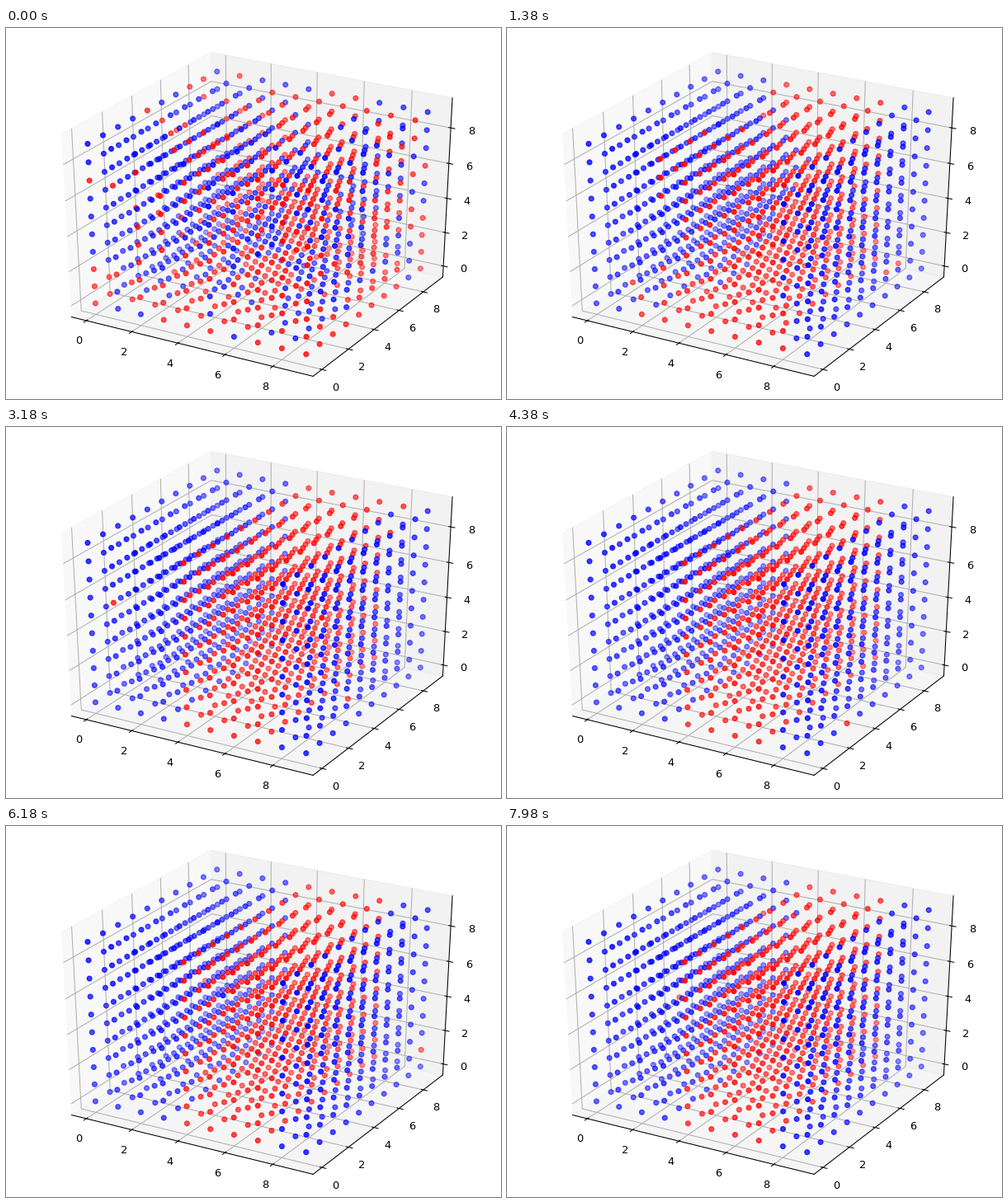
Recreate the animation shown at these times as a matplotlib script. Size 600 px wide and 450 px high, loop 8 s.

```python
import numpy as np
import matplotlib.pyplot as plt
from matplotlib.animation import FuncAnimation
from mpl_toolkits.mplot3d import Axes3D

N = 10
INTERVAL = 50
FRAMES = 160
FLIP_RATE = 0.004
TICKS = range(0, N, 2)
RED, BLUE = (1, 0, 0, 1), (0, 0, 1, 1)


class FullAxes3D(Axes3D):
    """3D axes that fill their whole rectangle instead of a square."""

    def apply_aspect(self, position=None):
        pass


def smooth_noise(seed):
    """Unit noise on the periodic lattice, correlated between neighbours."""
    noise = np.random.default_rng(seed).normal(size=(N, N, N))
    for axis in range(3):
        noise += 0.2 * (np.roll(noise, 1, axis) + np.roll(noise, -1, axis))
    return (noise - noise.mean()) / noise.std()


i, j, k = np.indices((N, N, N))
noise = smooth_noise(7)

# Distance from the edge j = k = 0 on the periodic lattice
reach = np.minimum(j, N - j) + np.minimum(k, N - k)


def spins_at(step):
    """A noisy red blob relaxes into a flat slab, with rare thermal flips."""
    bulge = max(0, 1 - step / 14) * (1 - reach / 5)
    left = 4 - 3.5 * bulge
    right = 7 + 1.5 * bulge
    depth = np.minimum(i - left, right - i) + 0.5
    red = depth + 4 * np.exp(-step / 2) * noise > 0
    flips = np.random.default_rng(100 + step).random(red.shape) < FLIP_RATE
    return red ^ flips


def colours(step):
    return np.where(spins_at(step).reshape(-1, 1), RED, BLUE).astype(float)


fig = plt.figure(figsize=(6.4, 4.8), dpi=93.75, facecolor="white")
ax = fig.add_axes((0, 0, 1, 1), axes_class=FullAxes3D)
ax.view_init(elev=30, azim=-60)
# Unit cube seen from a distance of ten
ax.set_box_aspect((1, 1, 1), zoom=np.sqrt(3) / 1.8294640721620434)

dots = ax.scatter(i.ravel(), j.ravel(), k.ravel(), s=20, c=colours(0))

half = 4.95 * 25 / 24
limits = (4.5 - half, 4.5 + half)
ax.set(xlim=limits, ylim=limits, zlim=limits,
       xticks=TICKS, yticks=TICKS, zticks=TICKS)


def update(frame):
    # The lattice advances every fourth frame
    dots.set_facecolor(colours((frame + 1) // 4))
    return (dots,)


anim = FuncAnimation(fig, update, frames=FRAMES, interval=INTERVAL,
                     repeat=True, repeat_delay=0, blit=False)
plt.show()
```
